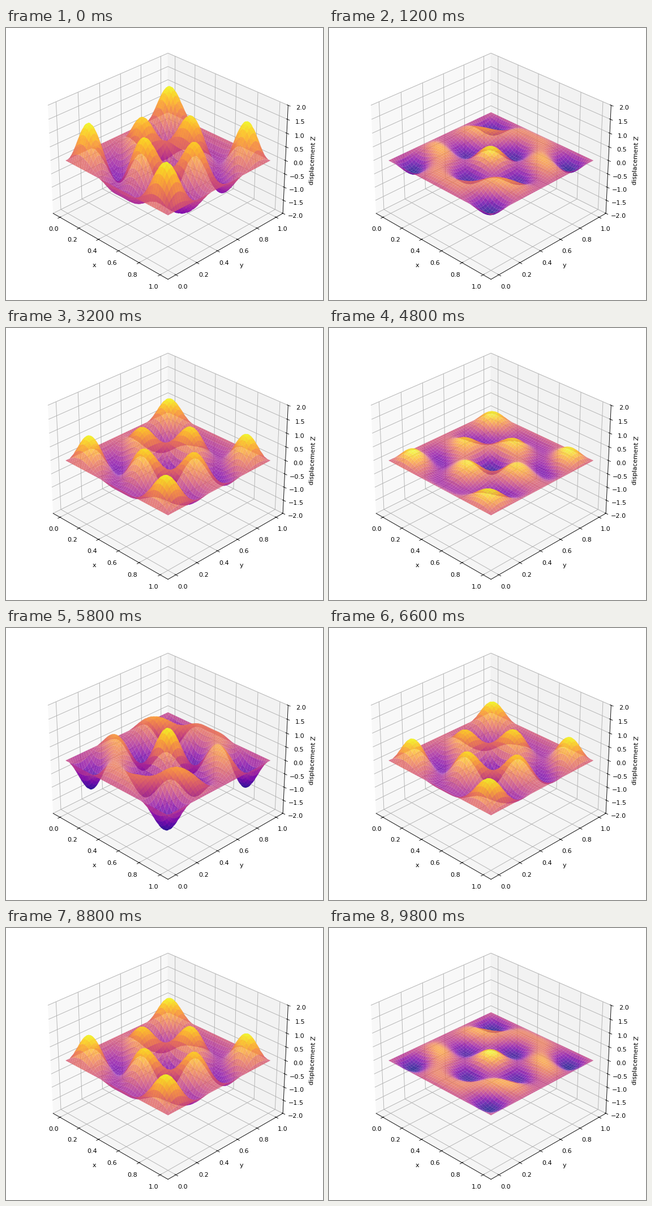
A matplotlib script for the animation above (10000 ms loop, 560x480 px).

```python
import numpy as np
import matplotlib.pyplot as plt
from matplotlib.animation import FuncAnimation

W, H, DPI = 560, 480, 80
FRAMES, INTERVAL = 50, 200
DT = 0.04
M, N = 3, 5
PAD = 12

axis = np.linspace(0, 1, 100)
X, Y = np.meshgrid(axis, axis)
OMEGA = np.pi * np.hypot(M, N)


def mode(m, n):
    return np.sin(m * np.pi * X) * np.sin(n * np.pi * Y)


# Two degenerate modes of a square membrane share one frequency
SHAPE = mode(M, N) + 0.6 * mode(N, M)

fig = plt.figure(figsize=(W / DPI, H / DPI), dpi=DPI)
side = H - 2 * PAD
ax = fig.add_axes([(W - side) / 2 / W, PAD / H, side / W, side / H],
                  projection="3d")
ax.view_init(elev=30, azim=-45)
ax.set_zlim(-2, 2)
ax.set_xlabel("x")
ax.set_ylabel("y")
ax.set_zlabel("displacement Z")


def update(i):
    for surf in list(ax.collections):
        surf.remove()
    z = SHAPE * np.cos(OMEGA * DT * i)
    return [ax.plot_surface(X, Y, z, cmap="plasma", alpha=0.8,
                            linewidth=0, antialiased=True)]


anim = FuncAnimation(fig, update, frames=FRAMES, interval=INTERVAL,
                     init_func=lambda: update(0), repeat=True,
                     repeat_delay=0, blit=False)
plt.show()
```
